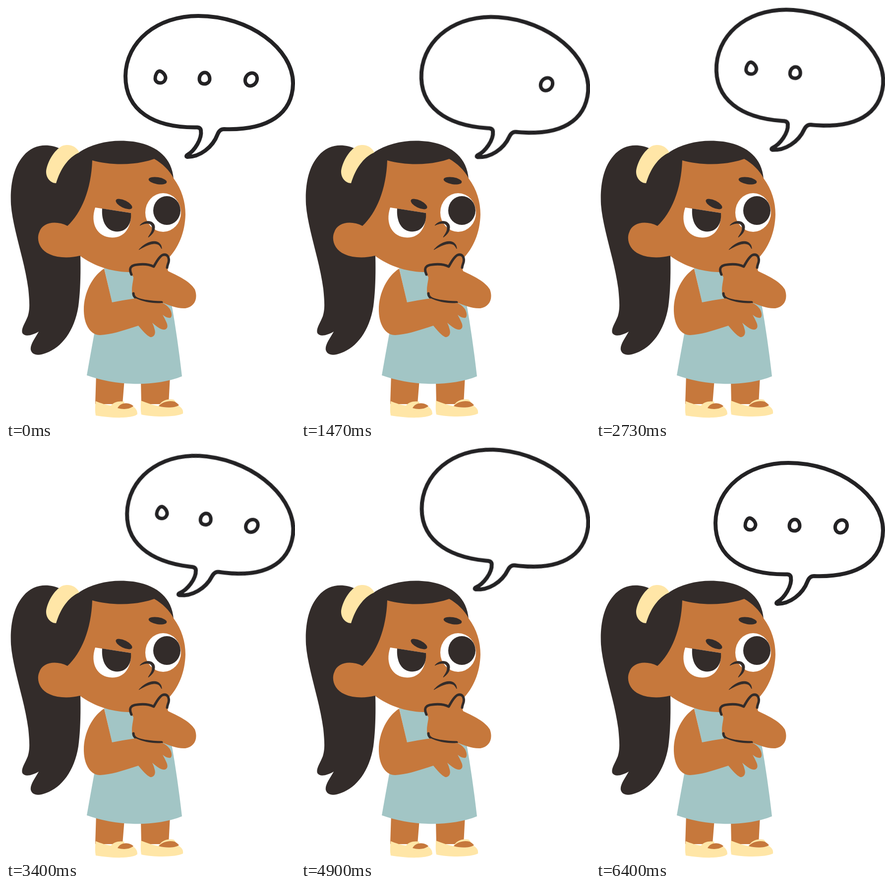
Recreate the animation shown at these times as an HTML page without scripts. Size 583 px wide and 830 px high, loop 7.06 s.

```html
<!DOCTYPE html>
<html lang="en">
<head>
<meta charset="utf-8">
<title>Thinking girl</title>
<style>
  html, body { margin: 0; width: 100%; height: 100%; overflow: hidden; background: #fff; }
  svg { display: block; width: 100%; height: 100%; }

  .hair { fill: #332c2a; }
  .skin { fill: #c6783c; }
  .dress { fill: #a2c5c5; }
  .cream { fill: #ffe6a7; }
  .white { fill: #fff; }
  .line { fill: none; stroke: #332c2a; stroke-width: 5; stroke-linecap: round; stroke-linejoin: round; }
  .thin { stroke: #332c2a; stroke-width: 1; stroke-linejoin: round; }
  .ink { fill: #fff; stroke: #232224; stroke-width: 8; stroke-linejoin: round; }

  .bob, .tilt, .dot { animation: 7060ms infinite; }
  .bob { animation-name: bob; animation-timing-function: cubic-bezier(.37, 0, .63, 1); }
  .tilt { animation-name: tilt; animation-timing-function: cubic-bezier(.37, 0, .63, 1); transform-origin: 410px 165px; }
  .dot { stroke-width: 7; animation-timing-function: step-end; }
  .d1 { animation-name: d1; }
  .d2 { animation-name: d2; }
  .d3 { animation-name: d3; }

  @keyframes bob {
    0% { transform: translateY(0); }
    12.32% { transform: translateY(-10.5px); }
    27.76% { transform: translateY(14px); }
    40.5% { transform: translateY(-12px); }
    54.67% { transform: translateY(14px); }
    68.41% { transform: translateY(-10.5px); }
    81.87%, 100% { transform: translateY(14px); }
  }
  @keyframes tilt {
    0%, 29.04% { transform: rotate(0); }
    13.88% { transform: rotate(7deg); }
    46.5% { transform: rotate(7.1deg); }
    58.78% { transform: rotate(1.5deg); }
    70.82% { transform: rotate(5.8deg); }
    83.14%, 100% { transform: rotate(0); }
  }
  @keyframes d1 {
    0%, 27.62%, 75.5% { visibility: visible; }
    8.92%, 52.83% { visibility: hidden; }
    100% { visibility: visible; }
  }
  @keyframes d2 {
    0%, 34.99%, 83.14% { visibility: visible; }
    15.58%, 61.33% { visibility: hidden; }
    100% { visibility: visible; }
  }
  @keyframes d3 {
    0%, 42.49%, 90.65% { visibility: visible; }
    21.95%, 67.99% { visibility: hidden; }
    100% { visibility: visible; }
  }
</style>
</head>
<body>
<svg viewBox="0 0 583 830" preserveAspectRatio="none">
  <!-- ponytail and hair -->
  <g class="hair">
    <path d="M110 288C85 276 55 278 35 302C15 325 8 360 10 400C14 450 37 510 45 570C48 600 48 612 44 625C38 640 30 650 33 659C38 667 52 664 66 656C58 670 48 683 50 693C53 704 66 705 81 699C112 688 138 655 146 605C150 575 151 540 150 500L150 400Z"/>
    <path d="M101 357C110 328 125 305 147 295C178 274 222 267 262 274C306 282 335 307 338 348L299 330L180 330L140 445L60 460L60 380Z"/>
  </g>
  <path class="cream" d="M101 357C90 357 80 346 81 332C84 312 98 290 113 282C128 277 141 282 148 295C125 305 110 328 101 357Z"/>

  <!-- legs and shoes -->
  <path class="skin" d="M182 740L180 802H235L239 752ZM272 752L273 802H328L331 745Z"/>
  <path class="cream" d="M181 796C190 800 203 804 212 805C216 798 228 795 239 797C237 803 240 804 255 806C262 810 265 815 265 822C258 831 215 831 181 825C179 815 180 805 181 796Z"/>
  <path class="cream" d="M272 795C285 800 297 804 308 806C311 797 325 790 338 793C344 797 343 801 346 804C355 809 358 814 357 821C345 828 300 829 273 823C271 812 272 804 272 795Z"/>
  <path class="skin" d="M225 810C230 801 239 799 248 801Q254 803 257 806C249 813 236 813 225 810ZM308 806C315 797 330 794 340 797Q346 800 349 804C341 810 321 810 308 806Z"/>

  <path class="dress" d="M198 528L258 534L262 590L334 600Q346 668 355 746C300 768 220 765 163 744Q170 704 179 655L214 598Z"/>

  <!-- head -->
  <path class="skin" d="M174 311C210 321 260 322 299 308C315 317 330 331 338 347C355 370 362 395 362 420C361 460 345 495 318 517C300 531 270 537 246 536C206 535 172 520 149 503C130 508 105 508 88 500C67 491 61 470 67 456C73 436 100 431 124 443C152 417 172 370 174 311Z"/>
  <path class="white" d="M180 406L252 417C253 446 239 467 214 466.500C184 466 169 438 180 406Z"/>
  <path class="hair" d="M194 408L252 417C254 440 242 454.500 224 454.500C204 454 192 436 194 408Z"/>
  <ellipse class="white" cx="317" cy="416" rx="36" ry="39"/>
  <ellipse class="hair" cx="324.500" cy="412" rx="27.500" ry="29"/>
  <g class="hair">
    <ellipse cx="238" cy="399" rx="18" ry="7.5" transform="rotate(26 238 399)"/>
    <ellipse cx="306" cy="352" rx="18.500" ry="7" transform="rotate(9 306 352)"/>
    <path class="thin" d="M270 442C280 430 299 431 300 445C300 455 294 461 287 466C289 461 296 454 295 446C293 436 283 436 270 442Z"/>
    <path class="thin" d="M268 491C278 479 294 472 304 475C311 477 314 483 314 489C310 482 308 480 302 479C293 478 282 483 268 491Z"/>
  </g>

  <!-- hand on chin -->
  <path class="skin" d="M257 546C248 535 248 522 265 520C280 518 290 523 298 525C303 517 307 507 315 502C325 498 330 506 328 516C326 524 325 529 327 534C345 543 370 553 381 571C388 590 380 606 362 609C345 610 330 603 316 598C295 600 262 596 255 582C252 566 257 556 257 546Z"/>
  <path class="line" d="M253 541C247 528 252 522 265 521C280 519 290 521 298 525C303 517 307 507 315 502C325 498 330 506 328 516Q325 525 325 527"/>
  <path class="line" d="M257 579C257 590 270 592 280 594Q298 597 314 597"/>

  <!-- crossed arm -->
  <path class="skin" d="M198 529C173 545 156 580 157 615C158 645 172 663 190 663C215 662 245 651 267 644C276 655 284 664 291 667C300 667 302 659 300 652Q298 644 295 638C304 646 312 652 319 652C326 651 327 645 324 638Q320 629 316 622C322 627 327 629 332 628C336 624 334 617 331 611C326 604 321 601 315 598C297 600 278 596 262 589Q240 592 214 597Z"/>

  <!-- speech bubble -->
  <g class="bob">
    <g class="tilt">
      <path class="ink" d="M386 244.500C298 246 241 211 241 141C242 71 305 20 388 20C491 20 579 86 579 156C578 216 531 251 440 248Q431 248 427 258C417 285 391 304 366 304Q362 303 366 300C380 292 396 268 393 250Q392 245 386 244.500Z"/>
      <path class="ink dot d1" d="M310 131C316 132 322 139 322 145C321 151 317 155 311 155C305 155 301 151 301 146C301 139 305 131 310 131Z"/>
      <path class="ink dot d2" d="M401 134C407 134 411 140 411 147C411 153 406 157 400 157C394 157 390 153 390 147C390 140 395 134 401 134Z"/>
      <ellipse class="ink dot d3" cx="494.500" cy="148" rx="11.500" ry="13.500" transform="rotate(32 494.500 148)"/>
    </g>
  </g>
</svg>
</body>
</html>
```
